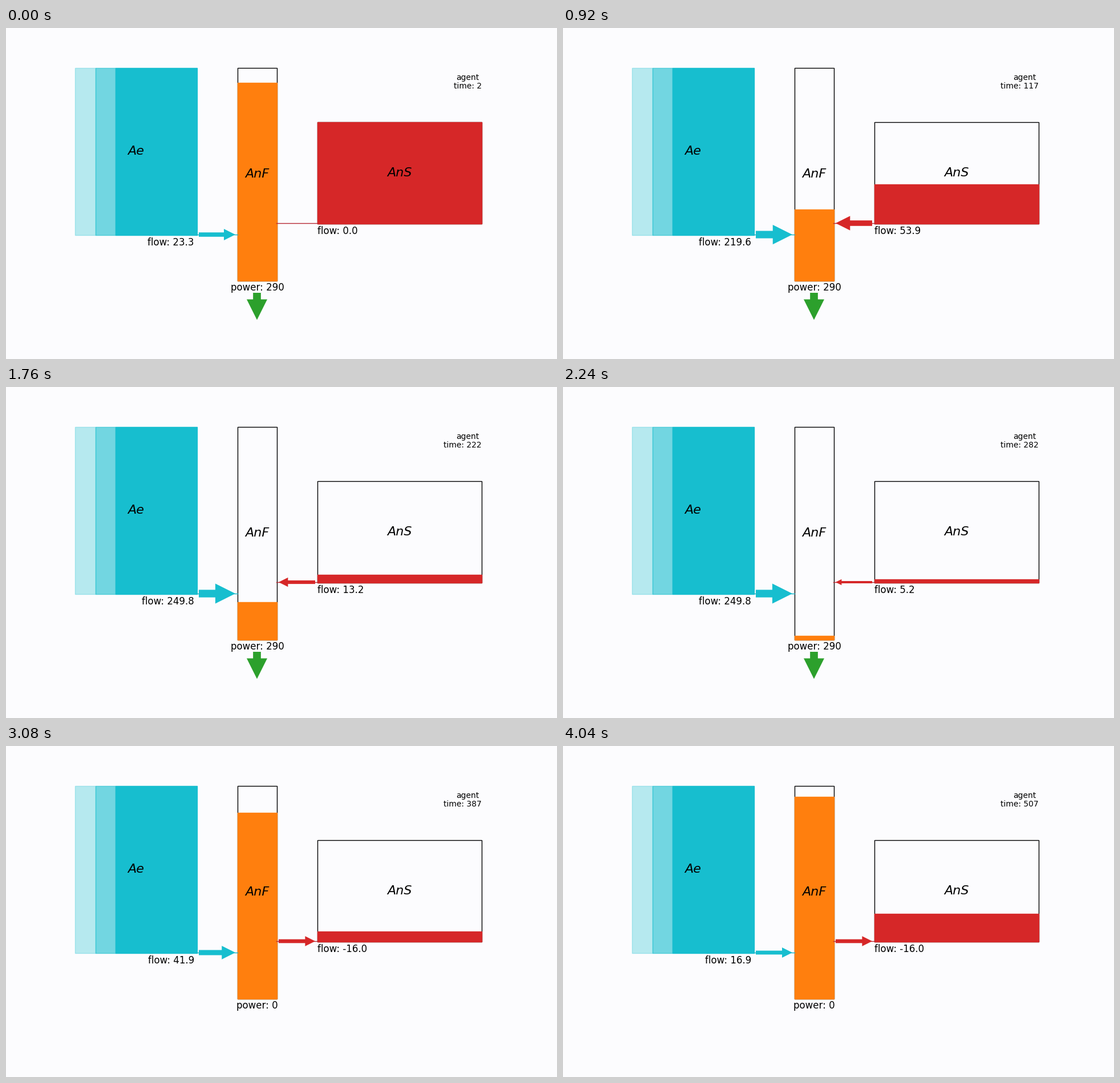
These frames come from a looping animation (966 px wide and 580 px high, 4.08 s). A matplotlib script:

```python
import math

import matplotlib.pyplot as plt
from matplotlib.animation import FuncAnimation
from matplotlib.patches import Polygon, Rectangle

W, H, DPI = 966, 580, 100
FRAMES, INTERVAL = 102, 40
CYAN, ORANGE, RED, GREEN = "#17becf", "#ff7f0e", "#d62728", "#2ca02c"
TOP, FLOOR = 70, 442.5           # fast tank
SLOW_TOP, SLOW_FLOOR = 165, 342.5
AE_PIPE, SLOW_PIPE = 362, 342

# Hydraulic model, levels measured in pixels of depletion
FAST_AREA, SLOW_AREA = 32.2, 62
AE_RATE, AE_MAX = 0.887, 249.8
SLOW_RATE, REFILL_RATE, REFILL_MAX = 0.961, 0.097, 16.0
THETA = 82
DEPTH, SLOW_DEPTH = FLOOR - TOP, SLOW_FLOOR - SLOW_TOP
WORK, WORK_END = 290, 300


def ae_flow(h):
    return min(AE_RATE * h, AE_MAX)


def slow_flow(h, g):
    diff = min(h, THETA + SLOW_DEPTH) - g - THETA
    if diff >= 0:
        return SLOW_RATE * diff
    return max(REFILL_RATE * diff, -REFILL_MAX) if g > 0 else 0.0


def simulate():
    """One state per second: fast depletion, slow depletion, power."""
    h = g = 0.0
    states = []
    for second in range(3 + 5 * FRAMES):
        power = WORK if second < WORK_END else 0
        ae, slow = ae_flow(h), slow_flow(h, g)
        h = min(max(h + (power - ae - slow) / FAST_AREA, 0), DEPTH)
        g = min(max(g + slow / SLOW_AREA, 0), SLOW_DEPTH)
        states.append((h, g, power))
    return states


STATES = simulate()

plt.rcParams["font.family"] = "DejaVu Sans"
fig = plt.figure(figsize=(W / DPI, H / DPI), dpi=DPI, facecolor="#fcfcfe")
ax = fig.add_axes([0, 0, 1, 1])
ax.set(xlim=(0, W), ylim=(H, 0))
ax.axis("off")


def box(x0, y0, x1, y1, **style):
    return ax.add_patch(Rectangle((x0, y0), x1 - x0, y1 - y0, lw=1, **style))


def name(x, y, text):
    ax.text(x, y, text, size=16, style="italic", ha="center", va="center", zorder=5)


def label(x, y, ha, size=12, text=""):
    return ax.text(x, y, text, size=size, ha=ha, va="baseline", zorder=5)


def arrow(color):
    return ax.add_patch(Polygon([(0, 0)] * 3, fc=color, ec="none", zorder=3))


def aim(patch, start, end, flow):
    """Reshape an arrow; its size grows with the log of the flow."""
    size = 6.35 * math.log(max(abs(flow), 1))
    patch.set_visible(size > 0)
    if not size:
        return
    length = math.dist(start, end)
    ux, uy = (end[0] - start[0]) / length, (end[1] - start[1]) / length
    neck, tail, head = max(length - size, 0), 0.19 * size, size / 2
    outline = [(0, tail), (neck, tail), (neck, head), (length, 0),
               (neck, -head), (neck, -tail), (0, -tail)]
    patch.set_xy([(start[0] + a * ux - b * uy, start[1] + a * uy + b * ux)
                  for a, b in outline])


# Open tank on the left fades out to the side
for x0, x1, alpha in ((121, 156.5, 0.3), (156.5, 192, 0.6), (192, 335, 1)):
    box(x0, TOP, x1, 362.5, color=CYAN, alpha=alpha)

box(406, TOP, 475, FLOOR, fc="none", ec="black")
box(546, SLOW_TOP, 834, SLOW_FLOOR, fc="none", ec="black")
fast = box(406, TOP, 475, FLOOR, color=ORANGE)
slow = box(546, SLOW_TOP, 834, SLOW_FLOOR, color=RED)

ax.plot([335, 406], [AE_PIPE] * 2, color="#17b4c5", lw=1)
ax.plot([474, 546], [SLOW_PIPE] * 2, color="#b62a34", lw=1)

name(228, 216.3, "Ae")
name(440.5, 256.3, "AnF")
name(690, 253.8, "AnS")

ae_text = label(330, 381, "right")
slow_text = label(546, 361, "left")
power_text = label(440.5, 460, "center")
label(829.5, 91, "right", 10, "agent")
time_text = label(834, 106, "right", 10)

ae_arrow, slow_arrow, power_arrow = arrow(CYAN), arrow(RED), arrow(GREEN)


def set_level(rect, top, floor, used):
    rect.set_y(top + used)
    rect.set_height(floor - top - used)


def update(i):
    second = 2 + 5 * i
    h, g, power = STATES[second]
    p_ae, p_slow = ae_flow(h), slow_flow(h, g)

    set_level(fast, TOP, FLOOR, h)
    set_level(slow, SLOW_TOP, SLOW_FLOOR, g)

    aim(ae_arrow, (338, AE_PIPE), (402, AE_PIPE), p_ae)
    ends = [(542, SLOW_PIPE), (478, SLOW_PIPE)]
    aim(slow_arrow, *(ends if p_slow >= 0 else ends[::-1]), p_slow)
    aim(power_arrow, (440, 464), (440, 511.5), power)

    ae_text.set_text(f"flow: {p_ae:.1f}")
    slow_text.set_text(f"flow: {p_slow:.1f}")
    power_text.set_text(f"power: {power}")
    time_text.set_text(f"time: {second}")
    return []


anim = FuncAnimation(fig, update, frames=FRAMES, interval=INTERVAL,
                     repeat=True, repeat_delay=0)
plt.show()
```
